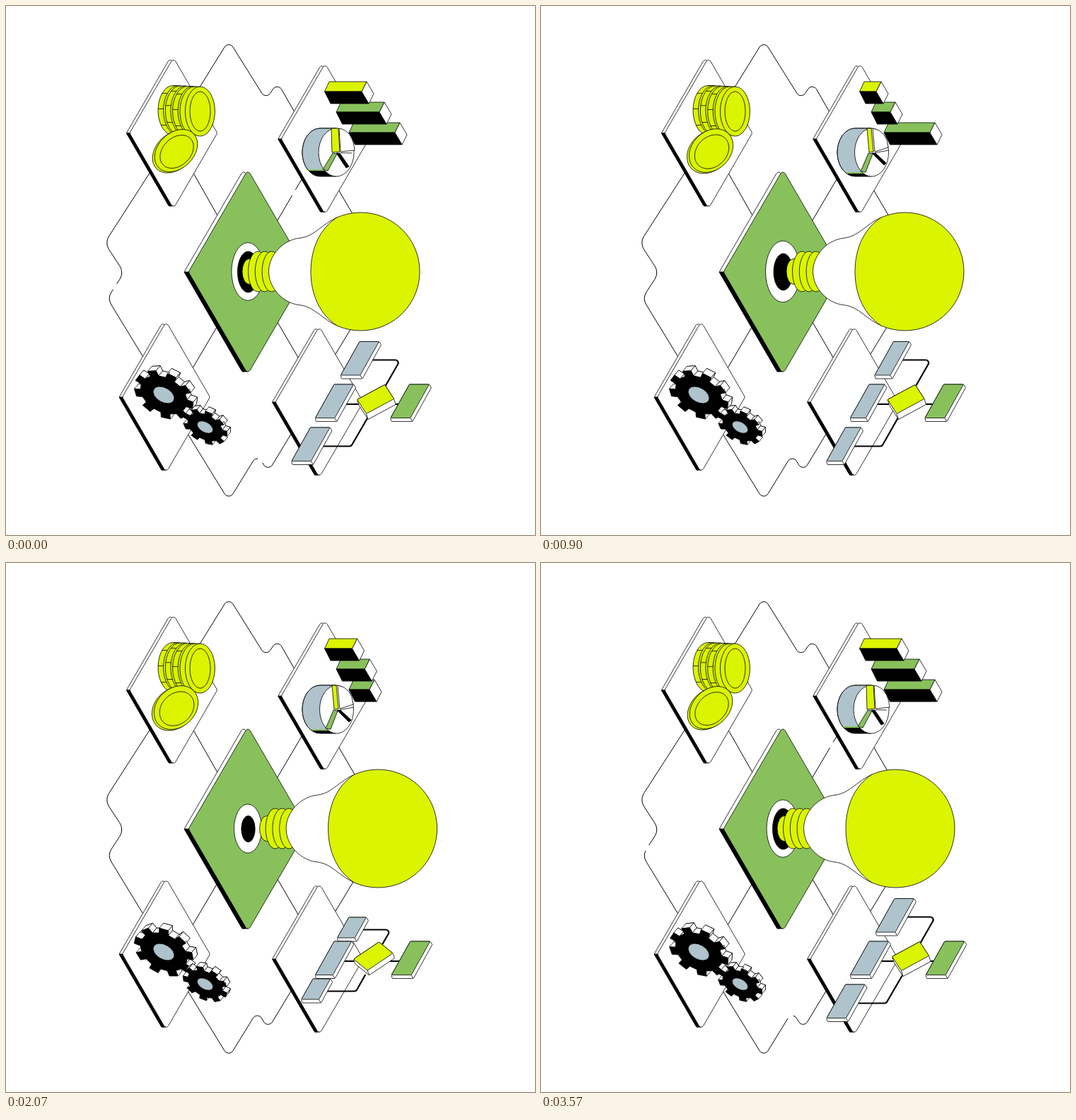
Write an HTML page with a canvas that moves like this. It is 748x748 px and loops after 3.6 s.

```html
<!DOCTYPE html>
<html lang="en">
<head>
<meta charset="utf-8">
<title>Idea network</title>
<style>
html, body { margin: 0; width: 100%; height: 100%; overflow: hidden; background: #fff; }
canvas { display: block; }
</style>
</head>
<body>
<canvas id="stage" width="748" height="748"></canvas>
<script>
const ctx = document.getElementById('stage').getContext('2d');
const LIME = '#dbf400', GREEN = '#88c15c', BLUE = '#aec3cb', WHITE = '#fff', BLACK = '#000';
const LOOP = 3600, TAU = Math.PI * 2, DEG = TAU / 360;
let now = 0;

const since = start => (now - start + LOOP) % LOOP;
const wave = (peak, cycles = 1) => Math.cos(TAU * (cycles * now / LOOP - peak));

function ease(u) {
  u = Math.max(0, Math.min(1, u));
  return u * u * (3 - 2 * u);
}

// Rises from 0 to 1 between a and b, falls back between c and d
function pulse(a, b, c, d) {
  const t = since(a);
  return ease(t / (b - a)) - ease((t - c + a) / (d - c));
}

function paint(fill, width = 0.8) {
  if (fill) { ctx.fillStyle = fill; ctx.fill(); }
  ctx.lineWidth = width;
  ctx.stroke();
}

function poly(pts, fill, r = 0) {
  const last = pts[pts.length - 1];
  ctx.beginPath();
  ctx.moveTo((last[0] + pts[0][0]) / 2, (last[1] + pts[0][1]) / 2);
  pts.forEach((p, i) => ctx.arcTo(...p, ...pts[(i + 1) % pts.length], r));
  ctx.closePath();
  paint(fill);
}

function line(pts, r = 0, width = 1) {
  ctx.beginPath();
  ctx.moveTo(...pts[0]);
  for (let i = 1; i < pts.length - 1; i++) ctx.arcTo(...pts[i], ...pts[i + 1], r);
  ctx.lineTo(...pts[pts.length - 1]);
  paint(null, width);
}

function oval(x, y, rx, ry, fill, rot = 0) {
  ctx.beginPath();
  ctx.ellipse(x, y, rx, ry, rot, 0, TAU);
  paint(fill);
}

// Line with a short gap running along it
function track(pts, r, speed, start) {
  ctx.setLineDash([speed * since(start), 9, 3000, 0]);
  line(pts, r);
  ctx.setLineDash([]);
}

function tracks() {
  track([[206, 516], [143.3, 413.3], [167, 377], [139.5, 335], [209, 227]], 17, 0.24, -554);
  track([[252, 597], [315, 699.4], [355.5, 633.5], [370.5, 659], [408, 597]], 7, 0.27, -685);
  track([[412, 157], [384, 108], [367.5, 132.5], [315, 48.5], [262, 134]], 7, 0.272, 2204);
  track([[424, 235], [378, 313]], 0, 0.25, -116);
  track([[258, 224], [304, 305]], 0, 0.25, 56);
  track([[304, 444], [258, 522]], 0, 0.25, 2386);
  line([[378, 437], [416, 502]]);
  line([[465, 251], [500, 311]]);
  line([[460, 502], [500, 436]]);
}

function tile(cx, cy, hw, fill, depth) {
  const hh = hw * 1.72;
  const rhombus = x => [[x - hw, cy], [x, cy - hh], [x + hw, cy], [x, cy + hh]];
  poly(rhombus(cx - depth), WHITE, 3.5);
  poly([[cx - hw - depth, cy], [cx - hw + 1, cy], [cx, cy + hh - 3.5],
    [cx - depth - 2, cy + hh - 3.5]], BLACK);
  poly(rhombus(cx), fill, 3.5);
}

function coins() {
  const rx = 21, ry = 35, d = 7.5;
  for (let i = 0; i < 4; i++) {
    const x = 236 + i * 10.3, y = 147.5 + i * 0.5;
    oval(x, y, rx, ry, LIME);
    ctx.fillRect(x, y - ry, d, 2 * ry);
    line([[x, y - ry], [x + d, y - ry]], 0, 0.8);
    oval(x + d, y, rx, ry, LIME);
    for (const a of [2.5, 3.2, 3.9]) {
      const tx = x + rx * Math.cos(a + i % 2 * 0.15), ty = y + ry * Math.sin(a + i % 2 * 0.15);
      if (i < 3) line([[tx, ty], [tx + d, ty]], 0, 0.8);
    }
  }
  oval(274.5, 149, 14.5, 28, LIME);

  const a = 34.5, b = 27 - 1.8 * wave(0, 3), tilt = -44 * DEG;
  oval(237.5, 206, a, b, LIME, tilt);
  oval(240.5, 204.5, a, b, LIME, tilt);
  oval(241.5, 206, a * 0.78, b * 0.78, LIME, tilt);
}

function bar(x, y, right, fill) {
  poly([[x, y], [right - 10, y], [right - 17, y + 14], [x - 6.5, y + 14]], fill);
  poly([[x - 6.5, y + 14], [right - 17, y + 14], [right - 7, y + 31], [x + 2, y + 31]], BLACK);
  poly([[right - 10, y], [right, y + 17], [right - 7, y + 31], [right - 17, y + 14]], WHITE);
}

function pie() {
  const k = pulse(360, 900, 2100, 2940), cut = 231 + 4 * k;
  for (const [fill, bottom] of [[BLACK, 245], [GREEN, cut + 2], [BLUE, cut]]) {
    ctx.save();
    ctx.beginPath();
    ctx.rect(410, 165, 60, bottom - 165);
    ctx.clip();
    ctx.beginPath();
    ctx.ellipse(444, 207, 25, 34, 0, TAU / 4, TAU * 3 / 4);
    ctx.lineTo(467, 173);
    ctx.lineTo(467, 241);
    ctx.closePath();
    paint(fill);
    ctx.restore();
  }
  oval(467 + k * 0.5, 207, 25 - k, 34, WHITE);
  poly([[448 + 4 * k, 231 + 3 * k], [462 + k, 208], [468 + k, 209], [455 + 4 * k, 233 + 2 * k]], GREEN);
  poly([[460 + k, 173], [470 - 3 * k, 173], [472 - 2 * k, 206], [461 + 3 * k, 207]], LIME);
  poly([[467 + k, 208], [472 + k, 208], [485 + 3 * k, 227 - 5 * k], [481 + 4 * k, 229 - 4 * k]], BLACK);
  ctx.beginPath();
  ctx.moveTo(473 - k, 206);
  ctx.lineTo(471 - 2 * k, 173);
  ctx.quadraticCurveTo(490 - k, 176, 493 - 2 * k, 204 - 4 * k);
  ctx.closePath();
  paint(WHITE);
  line([[473 - k, 207.5], [489 + 3 * k, 208 - 4 * k]], 0, 0.8);
}

function charts() {
  bar(491.5, 165, 567 - 36 * pulse(1000, 1870, 2500, 3020), GREEN);
  bar(473.5, 136, 545 - 34 * pulse(450, 900, 1300, 3100), GREEN);
  bar(457, 107, 520 - 29 * pulse(150, 830, 1650, 2450), LIME);
  pie();
}

function gear(cx, cy, a, b, phase, dx, dy) {
  const teeth = 9, tilt = 30 * DEG, cos = Math.cos(tilt), sin = Math.sin(tilt), pts = [];
  for (let i = 0; i < teeth; i++) {
    for (const [offset, r] of [[-0.28, 0.79], [-0.22, 1], [0.22, 1], [0.28, 0.79]]) {
      const angle = phase + (i + offset) * TAU / teeth;
      const u = a * r * Math.cos(angle), v = b * r * Math.sin(angle);
      pts.push([cx + u * cos - v * sin, cy + u * sin + v * cos]);
    }
  }
  const back = pts.map(([x, y]) => [x + dx, y + dy]);
  poly(back, WHITE);
  pts.forEach((p, i) => {
    const j = (i + 1) % pts.length, q = pts[j];
    const facing = (q[1] - p[1]) * dx - (q[0] - p[0]) * dy > 0;
    if (facing) poly([p, q, back[j], back[i]], WHITE);
  });
  poly(pts, BLACK);
  oval(cx, cy, a * 0.36, b * 0.34, BLUE, tilt);
}

function gears() {
  const turn = 8 / 9 * TAU * now / LOOP;
  gear(223, 550, 45, 30, -95 * DEG + turn, 6, -7);
  gear(281.5, 595.5, 34, 21, -140 * DEG - turn, 5, -6);
}

function block(x, y, w, h, fill) {
  const s = h * 0.56;
  const tr = [x + w, y], br = [x + w - s, y + h], bl = [x - s, y + h];
  poly([[x, y], tr, [tr[0] + 3, y + 4.5], [br[0] + 3, br[1] + 5], [bl[0] + 1, bl[1] + 5], bl], WHITE, 1);
  poly([[x, y], tr, br, bl], fill, 1);
  line([br, [br[0] + 2.5, br[1] + 4.5]], 0, 0.8);
}

// Square plate turned by an angle in the slanted plane
function plate(cx, cy, turn) {
  const cos = Math.cos(turn), sin = Math.sin(turn);
  const px = 26 * cos + 13 * sin, py = -0.5 * cos - 20.5 * sin;
  const qx = 13 * cos - 26 * sin, qy = -20.5 * cos + 0.5 * sin;
  const left = [cx - px, cy - py], top = [cx + qx, cy + qy];
  const right = [cx + px, cy + py], bottom = [cx - qx, cy - qy];
  const drop = p => [p[0] + 2.5, p[1] + 8 - 7 * turn], r = 1 + 5 * turn;
  poly([left, top, right, drop(right), drop(bottom), drop(left)], WHITE, r);
  poly([left, top, right, bottom], LIME, r);
  line([bottom, drop(bottom)], 0, 0.8);
}

function flow() {
  const slide = pulse(0, 360, 1650, 2500), shrink = pulse(900, 1620, 2520, 3030);
  const w = 27.5 - 5.5 * slide, h = 47.5 - 18.5 * shrink, cx = 522.5 - 6.5 * slide;
  const topX = 500 - 1.5 * slide - 14.5 * shrink, topY = 474.5 + 26.5 * shrink;
  const lowX = 430.5 + 3.5 * shrink, lowY = 596 - 8 * shrink;
  const greenX = 569.5 + 5 * pulse(1700, 2500, 3200, 3750);
  const upY = 500.5 + 18 * shrink, downY = 622.5 - 17 * shrink;
  line([[topX, upY], [557.5 - 6.5 * slide - 10 * shrink, upY], [cx + 13, 539]], 4, 2.2);
  line([[lowX, downY], [488 - 6 * slide + 10 * shrink, downY], [cx - 11, 582]], 4, 2.2);
  line([[460, 563], [greenX, 563]], 0, 2.2);
  block(topX, topY, w, h, BLUE);
  block(464, 535, w, 47.5, BLUE);
  block(lowX, lowY, w, h, BLUE);
  block(greenX, 535, 28, 47.5, GREEN);
  plate(cx, 556, 0.4 * pulse(1700, 2500, 2520, 3000));
}

function bulb() {
  const ring = 38.7 + 5.2 * wave(0.18), hole = 24 + 5.4 * wave(0.06);
  oval(342, 375.5, ring * 0.565, ring, WHITE);
  oval(342.5, 376, hole * 0.52, hole, BLACK);

  ctx.save();
  ctx.translate(13 - 13 * wave(0), 375.5);
  oval(344, 0, 10, 18, LIME);
  for (let i = 0; i < 3; i++) oval(356 + i * 9.8, 0, 13.5, 28.5, LIME);
  ctx.beginPath();
  ctx.moveTo(468, -76.5);
  ctx.bezierCurveTo(448, -68, 436, -50, 417, -47.5);
  ctx.bezierCurveTo(393, -46, 371.5, -24, 371.5, 0);
  ctx.bezierCurveTo(371.5, 24, 393, 46, 417, 47.5);
  ctx.bezierCurveTo(436, 50, 448, 68, 468, 76.5);
  ctx.closePath();
  paint(WHITE);
  const edge = Math.atan2(76.5, -33.5);
  ctx.beginPath();
  ctx.arc(501.5, 0, 83.5, -edge, edge);
  ctx.bezierCurveTo(444, 61, 431, 33, 431, 0);
  ctx.bezierCurveTo(431, -33, 444, -61, 468, -76.5);
  ctx.closePath();
  paint(LIME);
  ctx.restore();
}

function draw(ms) {
  now = Math.floor(ms % LOOP / 30) * 30;
  ctx.fillStyle = WHITE;
  ctx.fillRect(0, 0, 748, 748);
  ctx.strokeStyle = BLACK;
  tracks();
  tile(236.8, 179.7, 62, WHITE, 4.5);
  tile(451.2, 188, 62, WHITE, 4.5);
  tile(226.5, 553, 62, WHITE, 4.5);
  tile(443, 560, 62, WHITE, 4.5);
  tile(342, 376, 84, GREEN, 6);
  coins();
  charts();
  gears();
  flow();
  bulb();
  requestAnimationFrame(() => draw(performance.now() - begin));
}

const begin = performance.now();
draw(0);
</script>
</body>
</html>
```
